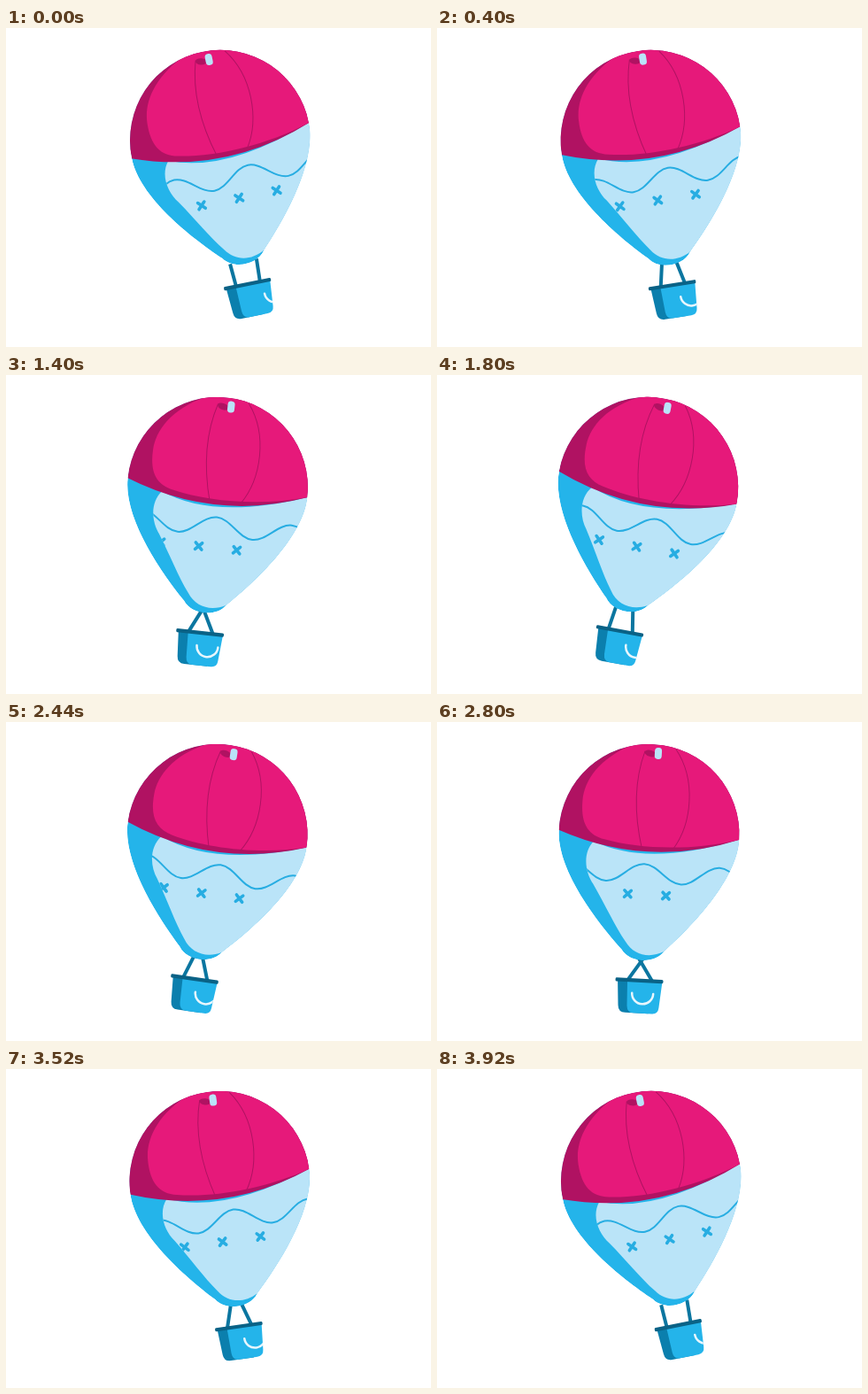
These frames come from a looping animation (480x360 px, 3960 ms). An HTML page:

```html
<!DOCTYPE html>
<html lang="en">
<head>
<meta charset="utf-8">
<title>Swaying balloon</title>
<style>
  html, body { margin: 0; width: 100%; height: 100%; overflow: hidden; background: #fff; }
  svg { display: block; width: 100vw; height: 100vh; fill: none; }
</style>
</head>
<body>
<svg viewBox="0 0 480 360">
  <defs>
    <path id="envelope" d="M-102 0A102 102 0 0 1 102 0C102 45 55 100 24 131C14 146-14 146-24 131C-55 100-102 45-102 0Z"/>
    <path id="panel" d="M-62 11C-74 25-70 46-60 59C-45 82-33 105-20 122C-10 137 8 140 24 131L110 131V0H102Q0 37-62 11Z"/>
    <path id="front" d="M-15.500 165H24L21.500 195Q21 202 14 202H-7Q-14 202-14.500 194Z"/>
    <path id="cross" d="M-3.700-3.700L3.700 3.700M-3.700 3.700L3.700-3.700"/>
    <clipPath id="inEnvelope"><use href="#envelope"/></clipPath>
    <clipPath id="inPanel"><use href="#panel"/></clipPath>
    <clipPath id="inFront"><use href="#front"/></clipPath>
  </defs>
  <g id="balloon">
    <path id="struts" stroke="#0b76a0" stroke-width="4"/>

    <g clip-path="url(#inEnvelope)">
      <use href="#envelope" fill="#24b4ea"/>
      <use href="#panel" fill="#bae4f8"/>
      <g clip-path="url(#inPanel)">
        <g id="pattern" stroke="#27ade2">
          <path id="wave" stroke-width="2"/>
          <g stroke-width="3.6" stroke-linecap="round">
            <use href="#cross" x="-43.200" y="68"/>
            <use href="#cross" y="68"/>
            <use href="#cross" x="43.200" y="68"/>
          </g>
        </g>
      </g>
      <path fill="#b01262" d="M-103 0V-103H103V0Q0 39-103 0Z"/>
      <path fill="#e6197a" d="M-18-103C-60-85-76-58-77-35C-78-10-70 4-50 8C-10 17 50 16 103 0V-103Z"/>
      <path stroke="#b01262" d="M-9.500-94C-20-60-19-25-7 17M25-98C50-65 48-15 28 15"/>
    </g>
    <ellipse cx="-3.500" cy="-91.500" rx="6.500" ry="3.600" transform="rotate(14 -3.500 -91.500)" fill="#b01262"/>
    <rect x="1.500" y="-98.500" width="8" height="13" rx="3.700" fill="#bae4f8"/>

    <path fill="#0b7fad" d="M-26.500 165H10V202H-16Q-24 202-24.500 194Z"/>
    <use href="#front" fill="#24b4ea"/>
    <g clip-path="url(#inFront)">
      <path id="smile" d="M-12 179.500a12 12 0 0 0 24 0" stroke="#e8f6fd" stroke-width="2.500" stroke-linecap="round"/>
    </g>
    <rect x="-29" y="163" width="54" height="4.200" rx="1.500" fill="#0a6286"/>
  </g>
</svg>
<script>
const LOOP = 3960;
const SWING = [-11.4, 11, -11.4];
const TURN = [8, -23, 2.2, -23, 8];

const $ = id => document.getElementById(id);
const set = (id, name, value) => $(id).setAttribute(name, value);

// Evenly spaced keys joined by ease-in-out segments
function ease(keys, step, t) {
  const i = Math.floor(t / step), s = t / step - i;
  return keys[i] + (keys[i + 1] - keys[i]) * s * s * (3 - 2 * s);
}

let wave = "M-110.5 54.5";
for (let i = 0; i < 6; i++) {
  const rise = i % 2 ? 21 : -21;
  wave += `c15.5 0 27 ${rise} 42.5 ${rise}`;
}
set("wave", "d", wave);

function draw(now) {
  const t = now % LOOP;
  const turn = ease(TURN, 1000, t);
  const spread = 10 + 0.65 * turn;
  set("balloon", "transform", `translate(240 117) rotate(${ease(SWING, 2000, t)}) translate(0 10)`);
  set("pattern", "transform", `translate(${turn})`);
  set("smile", "transform", `translate(${20 + 0.86 * turn})`);
  set("struts", "d", `M${-1.5 - spread} 139L-15 165M${-1.5 + spread} 139L12.5 165`);
  requestAnimationFrame(() => draw(performance.now()));
}
draw(0);
</script>
</body>
</html>
```
